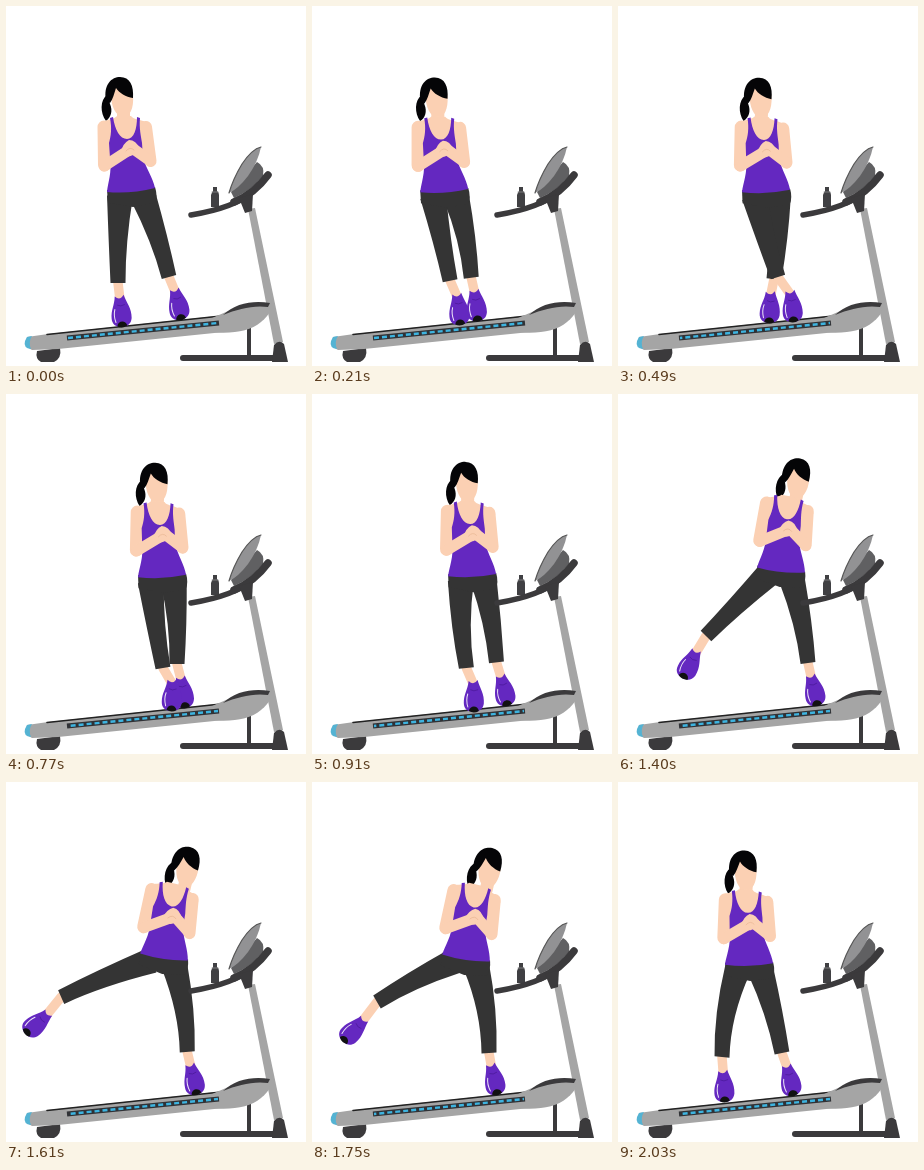
An HTML page with a canvas that plays this animation: 300x360 px, repeating every 2100 ms.

```html
<!DOCTYPE html>
<html lang="en">
<head>
<meta charset="utf-8">
<title>Treadmill side steps</title>
<style>
  html, body { margin: 0; width: 100%; height: 100%; overflow: hidden; background: #fff; }
  canvas { display: block; }
</style>
</head>
<body>
<canvas id="stage" width="300" height="360"></canvas>
<script>
const ctx = document.getElementById('stage').getContext('2d');
const STEP_MS = 70, STEPS = 30;
const SKIN = '#fbd0b3', PURPLE = '#6428c0', PANTS = '#343434', DARK = '#3b3a3c',
      GREY = '#a5a5a5', BLUE = '#3db4e0', HAIR = '#050507';

// step, waist x y, lean | left knee, hem, foot, foot angle | right knee, hem, foot, foot angle
const POSES = [
  [0,    125, 184, 0,    112, 235, 112, 277, 115, 305, -5,  152, 232, 163, 271, 172, 298, -12],
  [7,    148, 185, 2,    148, 233, 160, 271, 174, 300, -6,  160, 232, 156, 273, 152, 301, 3],
  [11,   156, 182, 2,    150, 232, 157, 274, 166, 301, 2,   171, 230, 171, 270, 177, 298, -8],
  [16,   164, 180, 2.5,  147, 232, 147, 274, 152, 303, -5,  189, 225, 200, 267, 207, 294, -16],
  [20,   163, 176, 11,   118, 212, 88, 242, 72, 270, 27,    184, 228, 190, 269, 196, 296, -12],
  [23.5, 157, 175, 13,   96, 196, 54, 214, 30, 240, 50,     177, 228, 180, 270, 186, 297, -12],
  [25,   154, 176, 13,   101, 199, 65, 220, 42, 248, 45,    174, 228, 177, 271, 182, 297, -12],
  [29,   131, 182, 3,    108, 232, 104, 275, 106, 304, -3,  155, 230, 164, 271, 172, 298, -12]
];

const key = i => {
  const n = POSES.length, p = POSES[(i + n) % n];
  return [p[0] + STEPS * Math.floor(i / n), ...p.slice(1)];
};

// Monotone cubic through the poses, wrapping round the loop
function poseAt(step) {
  let i = POSES.length - 1;
  while (POSES[i][0] > step) i--;
  const [a, b, c, d] = [key(i - 1), key(i), key(i + 1), key(i + 2)];
  const span = c[0] - b[0], u = (step - b[0]) / span;
  const slope = (p, q, k) => (q[k] - p[k]) / (q[0] - p[0]);
  const blend = (s, t) => s * t > 0 ? 2 * s * t / (s + t) : 0;
  return b.map((v, k) => {
    if (!k) return step;
    const s = slope(b, c, k);
    const m0 = blend(slope(a, b, k), s) * span, m1 = blend(s, slope(c, d, k)) * span;
    const e = u * u * (3 - 2 * u);
    return v + (c[k] - v) * e + u * (1 - u) * (m0 * (1 - u) - m1 * u);
  });
}

function fill(path, color) {
  ctx.fillStyle = color;
  ctx.fill(new Path2D(path));
}

function line(path, color, width, cap = 'round') {
  ctx.strokeStyle = color;
  ctx.lineWidth = width;
  ctx.lineCap = cap;
  ctx.lineJoin = 'round';
  ctx.stroke(new Path2D(path));
}

function treadmill(step) {
  line('M243 322 V350', DARK, 4, 'butt');
  line('M177 352 H272', DARK, 6);
  fill('M242 203 L249 202 L277 336 L268 338 Z', GREY);
  fill('M266 356 L268 339 Q273 333 278 338 L282 356 Z', DARK);
  fill('M31 345 L54 342 Q56 352 48 356 H35 Q29 353 31 345 Z', DARK);
  fill('M21 331 L42 328 L220 309 L218 326 L52 343 L26 344 Q18 341 21 331 Z', GREY);
  fill('M21 331 L26 330 Q22 336 25 343 Q17 342 19 335 Z', '#54b3d3');
  line('M41 328.5 L215 310', '#222', 1.6);
  fill('M204 313 C222 305 237 297 260 297 C268 301 263 310 255 316 C243 326 226 328 203 326 Z', GREY);
  fill('M217 309 C229 297 248 294 264 297 L262 301 C247 299 232 303 217 309 Z', DARK);
  line('M61 332 L213 317', '#303236', 5, 'butt');
  ctx.setLineDash([5, 3]);
  ctx.lineDashOffset = step * 8 / 3;
  line('M62 332 L212 317', BLUE, 2.4, 'butt');
  ctx.setLineDash([]);
}

function frontConsole() {
  fill('M251 156 Q259 160 257 170 Q246 184 228 192 L225 186 Z', '#606062');
  fill('M255 141 Q246 143 236 158 Q227 173 223 187 Q232 183 242 170 Q252 156 255 141 Z', '#929294');
  line('M255 141 Q246 143 236 158 Q227 173 223 187', '#555', 1.2);
  fill('M205 189 Q206 186 207 185 V181 H211 V185 Q213 186 213 189 V201 H205 Z', '#404043');
  line('M206 186 H212', '#8a8a8c', 0.8);
  line('M185 209 C209 205 232 199 246 186', DARK, 5.5);
  line('M228 196 Q248 188 262 169', DARK, 7.5);
  fill('M233 192 L247 188 L246 205 L239 207 Z', DARK);
}

function shoe(x, y, angle) {
  ctx.save();
  ctx.translate(x, y);
  ctx.rotate(angle * Math.PI / 180);
  fill('M-5 -15 Q0 -10 4 -16 C6 -8 11 -2 10 8 C9 14 5 16 0 16 C-6 16 -10 13 -10 7 C-10 -2 -6 -6 -5 -15 Z', PURPLE);
  line('M-6 -2 Q-8 4 -6 11', '#eee6f8', 1);
  line('M-3 -6 Q0 -4 4 -6', '#4d1a9d', 0.8);
  fill('M-5 15 C-4 9 4 9 5 15 Q0 18 -5 15 Z', '#111');
  ctx.restore();
}

function leg(hip, [kx, ky, hx, hy, fx, fy, angle]) {
  const r = angle * Math.PI / 180;
  line(`M${hx} ${hy} L${fx + 11 * Math.sin(r)} ${fy - 11 * Math.cos(r)}`, SKIN, 9.5);
  shoe(fx, fy, angle);

  const [x, y] = hip;
  const edge = (px, py, dx, dy, w) => {
    const n = w / Math.hypot(dx, dy);
    return [px - dy * n, py + dx * n];
  };
  const side = s => [
    edge(x, y, kx - x, ky - y, 13 * s),
    edge(kx, ky, hx - x, hy - y, 9.3 * s),
    edge(hx, hy, hx - kx, hy - ky, 7.5 * s)
  ];
  const bend = ([a, k, b]) => k.map((v, i) => 2 * v - (a[i] + b[i]) / 2);
  const p = side(1), q = side(-1);
  fill(`M${p[0]} Q${bend(p)} ${p[2]} L${q[2]} Q${bend(q)} ${q[0]} Z`, PANTS);
}

function head() {
  fill('M101 89 C94 94 94 107 100 115 C105 111 107 105 104 98 Z', HAIR);
  fill('M111 101 H124 V119 H111 Z', SKIN);
  fill('M105 88 C106 76 126 77 127 90 C128 102 124 111 117 111 C110 110 105 101 105 88 Z', SKIN);
  fill('M100 95 C97 78 106 71 114 71 C124 71 128 80 127 92 C120 91 113 87 110 82 C108 88 107 93 104 97 Z', HAIR);
}

function torso() {
  fill('M92 122 C93 113 107 115 111 110 H125 C128 115 143 113 146 122 L139 150 H100 Z', SKIN);
  line('M98 121 L98.5 159', SKIN, 13);
  line('M140 121 L144.5 155', SKIN, 12);
  fill('M104 112 L107 111 C109 124 114 133 121 133 C128 133 131 123 131 111 L134 112 ' +
       'C133 122 135 130 136 137 L137 152 C140 162 147 172 149 182 Q125 188 101 186 ' +
       'C102 176 106 167 104 152 L103 137 C105 130 106 122 104 112 Z', PURPLE);
  line('M98.5 160 L120 146', SKIN, 11);
  line('M144.5 155 L129 144', SKIN, 11);
  fill('M115 146 Q117 137 123 134 Q130 134 134 143 Q134 149 127 149 Q120 153 115 146 Z', SKIN);
  line('M120 145 Q124 140 128 144', '#e9b795', 0.7);
}

function person(step) {
  const p = poseAt(step), [, wx, wy, lean] = p;
  const r = lean * Math.PI / 180;
  const hip = dx => [
    wx + dx * Math.cos(r) - 6 * Math.sin(r),
    wy + dx * Math.sin(r) + 6 * Math.cos(r)
  ];
  leg(hip(12), p.slice(11));
  leg(hip(-11), p.slice(4, 11));

  ctx.save();
  ctx.translate(wx, wy);
  ctx.rotate(r);
  ctx.translate(-125, -184);
  fill('M101 184 L149 181 Q152 190 149 197 L127 201 L102 197 Z', PANTS);
  ctx.save();
  ctx.translate(lean * lean * 0.07, 0);
  head();
  ctx.restore();
  torso();
  ctx.restore();
}

function draw(now) {
  const step = Math.floor(Math.max(0, now - start) / STEP_MS) % STEPS;
  ctx.fillStyle = '#fff';
  ctx.fillRect(0, 0, 300, 360);
  treadmill(step);
  person(step);
  frontConsole();
  requestAnimationFrame(draw);
}

const start = performance.now();
draw(start);
</script>
</body>
</html>
```
